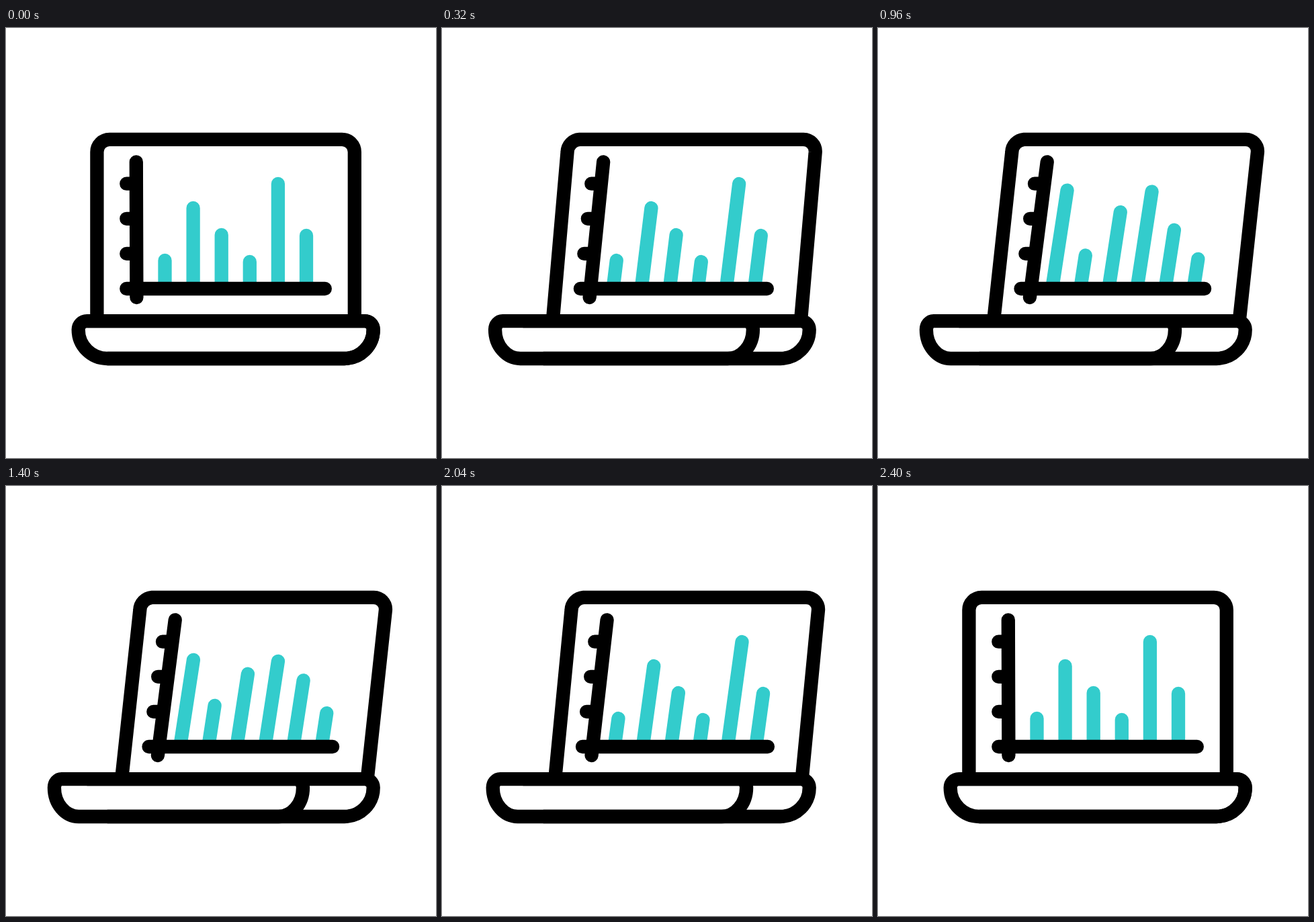
Recreate the animation shown at these times as an HTML page. Size 640 by 640 pixels, loop 2420 ms.

```html
<!DOCTYPE html>
<html lang="en">
<head>
<meta charset="utf-8">
<title>Laptop with bar chart</title>
<style>
html, body { margin: 0; width: 100%; height: 100%; overflow: hidden; background: #fff; }
svg { display: block; width: 100%; height: 100%; }
path { fill: none; stroke: #000; stroke-width: 20.3; }
#bars, #axes { stroke-linecap: round; }
#bars { stroke: #3cc; }
</style>
</head>
<body>
<svg viewBox="0 0 640 640">
  <path id="bars"/>
  <path id="axes"/>
  <path id="lid"/>
  <path id="back"/>
  <path id="front"/>
</svg>
<script>
const LOOP = 2420;
const BARS = [[40, 157], [118, 39], [78, 116], [38, 155], [154, 77], [77, 38]]; // two heights each

const lerp = (a, b, k) => a + (b - a) * k;
const smooth = x => x * x * (3 - 2 * x);
const ramp = (t, a, b) => smooth(Math.min(1, Math.max(0, (t - a) / (b - a))));
const draw = (id, d) => document.getElementById(id).setAttribute('d', d);

// Top edge, right corners and bottom edge of the tray
function trayRight(l, r, k) {
  return `M${l + 12.8 * k} 436.1H${r - 12.8 * k}A${12.8 * k} 12.8 0 0 1 ${r} 449` +
    `A${43 * k} 43 0 0 1 ${r - 43 * k} 492H${l + 43 * k}`;
}

function tray(l, r) {
  const k = (r - l) / 439;
  return trayRight(l, r, k) + `A${43 * k} 43 0 0 1 ${l} 449A${12.8 * k} 12.8 0 0 1 ${l + 12.8 * k} 436.1Z`;
}

function lid(turn) {
  const lean = 27.2 * turn;
  const l = 135.4 + 36.7 * turn, r = 518.8 + 18.9 * turn;
  const c = 18.7 - 0.7 * turn;
  return `M${l} 436L${l + lean} 184.6A${18.7 + turn} ${18.7 + turn} 0 0 1 ${l + lean + c} 165.8` +
    `H${r + lean - c}A${18.7 - turn} ${18.7 - turn} 0 0 1 ${r + lean} 184.6L${r} 436`;
}

function axes(turn) {
  const x = (x0, y) => x0 + turn * (33.2 + 0.131 * (388 - y));
  let d = `M${x(193.8, 199.3)} 199.3L${x(194.4, 401)} 401M${x(179.3, 388)} 388H${474.8 + 11.3 * turn}`;
  for (let i = 0; i < 3; i++) {
    const y = 231.7 + 52.1 * i;
    d += `M${x(179.3, y)} ${y}H${x(190, y)}`;
  }
  return d;
}

function bars(turn, swap) {
  return BARS.map(([a, b], i) => {
    const x = 236.5 + 42.1 * i + 22.9 * turn, h = lerp(a, b, swap);
    return `M${x} 386L${x + 0.1535 * turn * h} ${386 - h}`;
  }).join('');
}

function frame(now) {
  const t = now % LOOP;
  const turn = ramp(t, 0, 450) - ramp(t, 1950, 2400);
  // Heights swap there and back twice, 300 ms each way
  const phase = t > 600 && t < 1800 ? (t - 600) / 300 % 2 : 0;
  const swap = smooth(1 - Math.abs(1 - phase));

  draw('front', tray(107.7 - 35.8 * turn, 546.7 - 104.7 * turn));
  draw('lid', lid(turn));
  draw('axes', axes(turn));
  draw('bars', bars(turn, swap));
  requestAnimationFrame(frame);
}

draw('back', trayRight(107.7, 546.7, 1));
frame(performance.now());
</script>
</body>
</html>
```
